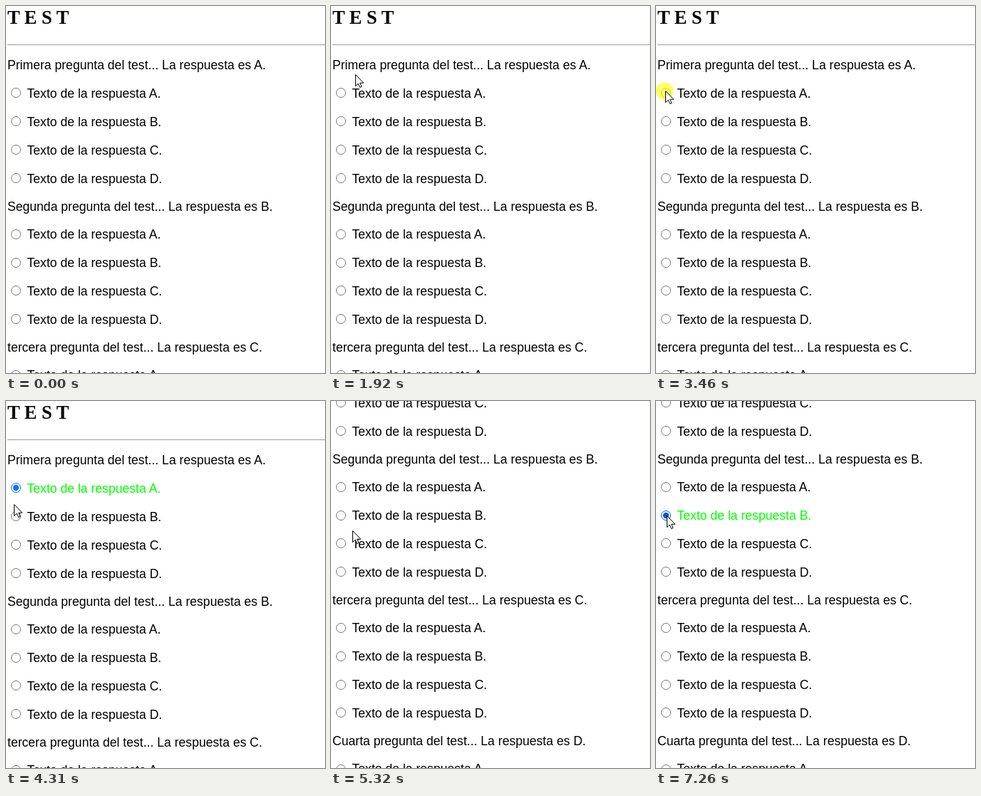
An HTML page for the animation above (8 s loop, 448 px wide and 516 px high).

```html
<!DOCTYPE html>
<html lang="es">
<head>
<meta charset="utf-8">
<title>Test</title>
<style>
  html, body { margin: 0; width: 100%; height: 100%; overflow: hidden; background: #fff; }
  svg { display: block; }
  text { font: 17.6px "Liberation Sans", Arial, sans-serif; }
  .title { font: bold 26.4px "Liberation Serif", "Times New Roman", serif; }
</style>
</head>
<body>
<svg width="448" height="516" viewBox="0 0 448 516">
  <g id="page">
    <text class="title" x="2" y="25">T E S T</text>
    <path d="M2 54.5H448" stroke="#9a9a9a"/>
  </g>
  <circle id="halo" r="12.3" fill="#ff0" fill-opacity=".6"/>
  <path id="arrow" d="M.5 .5V16.6L4.2 13.1L6.6 18.5L9 17.5L6.7 12.2H11.8Z" fill="#fff" stroke="#000"/>
  <path id="beam" d="M-3.5 -8H3.5M0 -8V8M-3.5 8H3.5" fill="none" stroke="#000"/>
</svg>
<script>
const LOOP = 8000, SCROLL_AT = 5320, SCROLL = 200, ENTER_AT = 200;
const $ = id => document.getElementById(id);
const page = $("page"), halo = $("halo"), arrow = $("arrow"), beam = $("beam");

function set(el, attrs) {
  for (const key in attrs) el.setAttribute(key, attrs[key]);
}
function add(tag, attrs, text = "") {
  const el = document.createElementNS("http://www.w3.org/2000/svg", tag);
  set(el, attrs);
  el.textContent = text;
  return page.appendChild(el);
}
const show = (el, on) => { el.style.display = on ? "" : "none"; };

const lines = [], radios = [];
function addLine(x, y, text) {
  const el = add("text", { x, y }, text);
  lines.push({ x, y, end: x + el.getComputedTextLength() });
  return el;
}

["Primera", "Segunda", "tercera", "Cuarta"].forEach((name, q) => {
  addLine(2, Math.round(89.4 + 198.3 * q),
    `${name} pregunta del test... La respuesta es ${"ABCD"[q]}.`);
  [..."ABCD"].forEach((letter, k) => {
    const cx = 14, cy = Math.round(122.42 + 198.4 * q + 39.7 * k);
    radios.push({
      cx, cy,
      ring: add("circle", { cx, cy, r: 6.5, fill: "#fff", "stroke-width": 1 }),
      dot: add("circle", { cx, cy, r: 4.2 }),
      label: addLine(29.5, 129 + 198 * q + 40 * k, `Texto de la respuesta ${letter}.`)
    });
  });
});

// Each glide eases the pointer from where it rests to a new point
const entry = { x: 366, y: 408 };
const glide = (from, to, x, y) => ({ from, to, x, y });
const glides = [
  glide(ENTER_AT, 890, 29.5, 117),
  glide(1050, 1120, 16, 120),
  glide(1850, 2220, 68, 52),
  glide(2390, 2470, 65, 72),
  glide(2470, 3230, 13, 119),
  glide(4150, 4310, 11, 145),
  glide(4310, 4540, 50, 189),
  glide(4690, 4920, 30, 182),
  glide(5640, 6410, 14, 121),
  glide(6790, 6870, 14.5, 161)
];
const clicks = [
  { from: 3230, to: 3540, x: 12, y: 119.5, radio: 0 },
  { from: 7100, to: 7260, x: 14, y: 161, radio: 5 }
];

const easeOut = f => 1 - (1 - f) ** 2;

function pointerAt(t) {
  let { x, y } = entry;
  for (const g of glides) {
    if (t < g.from) break;
    const f = easeOut(Math.min(1, (t - g.from) / (g.to - g.from)));
    x += (g.x - x) * f;
    y += (g.y - y) * f;
  }
  return { x, y };
}

function draw(t) {
  const top = t >= SCROLL_AT ? SCROLL : 0;
  page.setAttribute("transform", `translate(0 ${-top})`);

  const { x, y } = pointerAt(t), py = y + top, visible = t >= ENTER_AT;
  const overText = lines.some(l => x >= l.x - .5 && x <= l.end && py >= l.y - 16 && py <= l.y + 4);
  const place = `translate(${Math.round(x)} ${Math.round(y)})`;
  arrow.setAttribute("transform", place);
  beam.setAttribute("transform", place + " translate(-.5 .5)");
  show(arrow, visible && !overText);
  show(beam, visible && overText);

  const press = clicks.find(c => t >= c.from && t < c.to);
  show(halo, press);
  if (press) set(halo, { cx: press.x, cy: press.y });

  radios.forEach((r, i) => {
    const checked = clicks.some(c => c.radio === i && t >= c.to);
    const pressed = press && press.radio === i;
    const hover = Math.hypot(x - r.cx, py - r.cy) < 7.2;
    const color = checked ? (hover ? "#005cc8" : "#0075ff")
      : pressed ? "#8d8d8d" : hover ? "#4f4f4f" : "#767676";
    r.ring.setAttribute("stroke", color);
    r.dot.setAttribute("fill", color);
    show(r.dot, checked);
    r.label.setAttribute("fill", checked ? "#0f0" : "#000");
  });
}

const start = performance.now();
function tick() {
  draw((performance.now() - start) % LOOP);
  requestAnimationFrame(tick);
}
tick();
</script>
</body>
</html>
```
